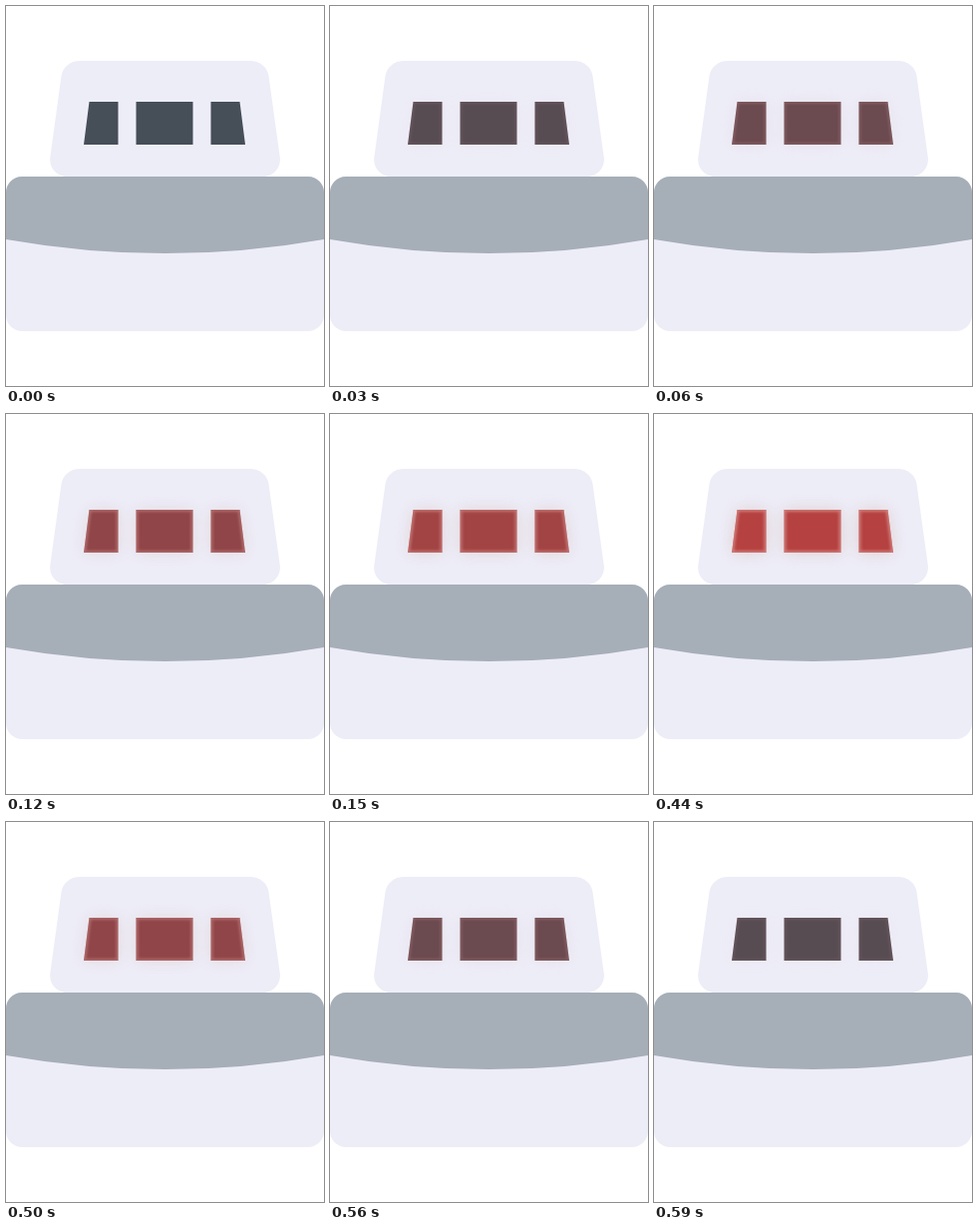
Recreate the animation shown at these times as an HTML page. Size 319x381 px, loop 620 ms.

```html
<!DOCTYPE html>
<html lang="en">
<head>
<meta charset="utf-8">
<title>Ship lights</title>
<style>
  html, body { margin: 0; width: 100%; height: 100%; overflow: hidden; background: #fff; }
  svg { display: block; width: 100%; height: 100%; }
</style>
</head>
<body>
<svg viewBox="0 0 319 381">
  <defs>
    <path id="panes" d="M83.5 96H112.5V139H78ZM130.5 96H187.5V139H130.5ZM205.5 96H234.5L240 139H205.5Z"/>
    <path id="cabin" d="M74 55H245C254 55 262 61 263.5 70L274.8 152C276 162 268 171 258 171H61C51 171 43 162 44.3 152L55.5 70C57 61 65 55 74 55Z"/>
    <clipPath id="inPanes"><use href="#panes"/></clipPath>
    <clipPath id="inCabin"><use href="#cabin"/></clipPath>
    <clipPath id="inHull"><rect y="171" width="319" height="155" rx="16"/></clipPath>
    <filter id="soft" filterUnits="userSpaceOnUse" x="30" y="50" width="260" height="135">
      <feGaussianBlur stdDeviation="8"/>
    </filter>
    <filter id="rim" filterUnits="userSpaceOnUse" x="60" y="80" width="200" height="75">
      <feGaussianBlur stdDeviation="1.8"/>
    </filter>
  </defs>

  <use href="#cabin" fill="#ededf8"/>
  <g clip-path="url(#inHull)">
    <rect y="171" width="319" height="155" fill="#ededf8"/>
    <path d="M0 171H319V234A916 916 0 0 1 0 234Z" fill="#a6aeb7"/>
  </g>

  <g id="glow" clip-path="url(#inCabin)">
    <use href="#panes" fill="#d2a596" opacity=".5" filter="url(#soft)"/>
  </g>
  <use id="glass" href="#panes"/>
  <g id="edge" clip-path="url(#inPanes)">
    <use href="#panes" fill="none" stroke="#e5aaa5" stroke-width="4" opacity=".65" filter="url(#rim)"/>
  </g>
</svg>
<script>
  const LOOP = 620, STEP = 30, LEVELS = 7, FADE = 440;
  const DARK = [70, 78, 87], LIT = [199, 63, 61];
  const [glow, glass, edge] = ['glow', 'glass', 'edge'].map(id => document.getElementById(id));

  // The lamps brighten and dim in seven equal steps.
  function level(t) {
    const up = Math.floor(t / STEP);
    const down = t < FADE ? LEVELS : LEVELS - 1 - Math.floor((t - FADE) / STEP);
    return Math.min(up, down, LEVELS) / LEVELS;
  }

  function draw(t) {
    const k = level(t);
    const rgb = DARK.map((c, i) => Math.round(c + (LIT[i] - c) * k));
    glass.setAttribute('fill', `rgb(${rgb})`);
    glow.setAttribute('opacity', k);
    edge.setAttribute('opacity', k);
  }

  const start = performance.now();
  function tick() {
    draw((performance.now() - start) % LOOP);
    requestAnimationFrame(tick);
  }
  draw(0);
  requestAnimationFrame(tick);
</script>
</body>
</html>
```
